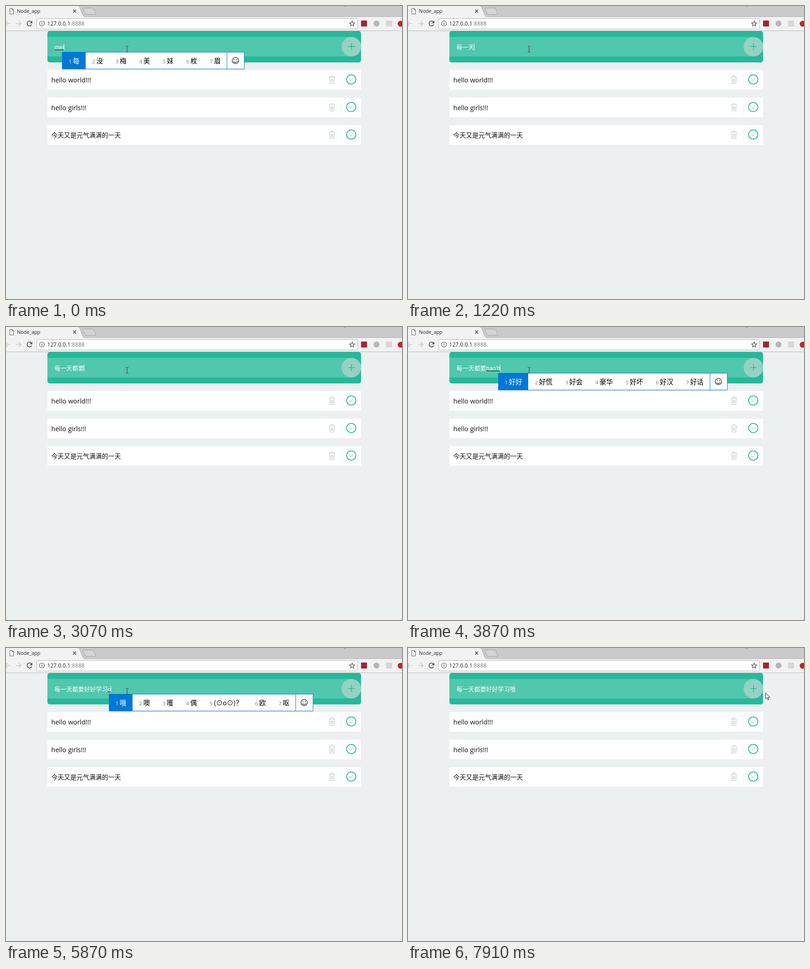
Write an HTML page with a canvas that moves like this. It is 870 by 644 pixels and loops after 8000 ms.

```html
<!DOCTYPE html>
<html lang="zh-CN">
<head>
<meta charset="utf-8">
<title>Node_app</title>
<style>
html, body { margin: 0; width: 100%; height: 100%; overflow: hidden; background: #ecf0f1; }
canvas { display: block; }
</style>
</head>
<body>
<canvas id="stage" width="870" height="644"></canvas>
<script>
const g = document.getElementById('stage').getContext('2d');
const CJK = '"Noto Sans CJK SC", "Noto Sans CJK", sans-serif';
const UI = '"Open Sans", "Noto Sans", ' + CJK;
const INPUT_FONT = '13px "Liberation Sans", ' + CJK;
const CAND_FONT = '14.67px ' + CJK;
const GREEN = '#25b99a', BLUE = '#0078d7', LOOP = 8000;

// start time, committed text, composing text, candidates
const A = '每一天', B = A + '都要', C = B + '好好学习';
const states = [
  [0, '', 'mei', '每 没 梅 美 妹 枚 眉'],
  [280, '', "mei'y", '每one 美元 没有 每月 梅雨 每一 没用'.replace('one', '样')],
  [410, '', "mei'yi", '每一 美意 美伊 美衣 美仪 美一 没一'],
  [560, '', "mei'yi't", '每一天 每一条 每一台 每一套 每一题 每一 美意'],
  [690, '', "mei'yi'ti", '每一题 每一 美意 美伊 美衣 美仪 美一'],
  [820, '', "mei'yi'tia", '每一条 每一 美意 美伊 美衣 美仪 美一'],
  [950, '', "mei'yi'tian", '每一天 每一 美意 美伊 美衣 美仪 美一'],
  [1220, A, ''],
  [1600, A, 'd', '的 都 到 大 对 多 地'],
  [1720, A, 'do', '都 动 东 懂 斗 豆 冬'],
  [1850, A, 'dou', '都 斗 豆 逗 o((⊙﹏⊙))o. 窦 抖'],
  [2130, A, "dou'y", '都有 都要 都用 抖音 都以 斗鱼 豆芽'],
  [2260, A, "dou'ya", '豆芽 斗鸭 都压 都 斗 豆 逗'],
  [2640, A, "dou'yao", '都要 斗妖 都 斗 豆 逗 抖'],
  [3070, B, ''],
  [3340, B, 'ha', '哈 蛤 铪 虾 奤 哈哈 哈儿'],
  [3460, B, 'hao', '好 号 浩 豪 (⊙o⊙)？ 毫 耗'],
  [3870, B, "hao'h", '好好 好慌 好会 豪华 好坏 好汉 好话'],
  [4020, B, "hao'hao", '好好 浩浩 豪豪 号号 昊昊 好号 好豪'],
  [5010, B, "hao'hao'x", '好好学 好好想 好好笑 好好 浩浩 豪豪 号号'],
  [5140, B, "hao'hao'xu", '好好需 好好 浩浩 豪豪 号号 昊昊 好号'],
  [5280, B, "hao'hao'xue", '好好学 好好 浩浩 豪豪 号号 昊昊 好号'],
  [5430, B, "hao'hao'xue'x", '好好学习 好好学 好好 浩浩 豪豪 号号 昊昊'],
  [5560, B, "hao'hao'xue'xi", '好好学习天天向上 好好学习 好好学 好好 浩浩 豪豪 号号'],
  [5700, C, ''],
  [5870, C, 'o', '哦 噢 嚄 偶 (⊙o⊙)？ 欧 呕'],
  [6130, C + '哦', '']
];
const caretOff = [[4580, 5010], [6680, 7080], [7630, LOOP]];
const pointer = [
  [0, 266, 95], [7080, 300, 96], [7220, 430, 118], [7350, 590, 147],
  [7500, 730, 172], [7630, 798, 165], [7770, 796, 128], [7910, 785, 98]
];

const at = (list, t) => list.filter(item => item[0] <= t).pop();

function rect(x, y, w, h, color) {
  g.fillStyle = color;
  g.fillRect(x, y, w, h);
}
function shape(path, fill, stroke, width = 1) {
  const p = typeof path === 'string' ? new Path2D(path) : path;
  if (fill) { g.fillStyle = fill; g.fill(p); }
  if (stroke) { g.strokeStyle = stroke; g.lineWidth = width; g.stroke(p); }
}
function box(x, y, w, h, r, fill, stroke) {
  const p = new Path2D();
  p.roundRect(x, y, w, h, r);
  shape(p, fill, stroke);
}
function circle(x, y, r, fill, stroke, width) {
  const p = new Path2D();
  p.arc(x, y, r, 0, 7);
  shape(p, fill, stroke, width);
}
// Draws text and returns its width
function text(str, x, y, font, color) {
  g.font = font;
  g.fillStyle = color;
  g.fillText(str, x, y);
  return g.measureText(str).width;
}

function drawBrowser() {
  rect(0, 0, 870, 24, '#cacaca');
  rect(742, 0, 4, 1, '#888');
  rect(0, 23, 870, 31, '#f2f2f2');
  rect(0, 23, 870, 1, '#b4b4b4');
  shape('M0 24V0H158C161 0 162 3 163 6L168 19Q170 23.5 174 24Z', '#f2f2f2');
  shape('M158 0C161 0 162 3 163 6L168 19Q170 23.5 174 23.5', null, '#adadad');
  shape('M170.500 4.500H190Q192 4.500 193 7L197 17Q197.500 18.500 195.500 18.500H177Q174.500 18.500 173.500 16L169 6.500Q168.500 4.500 170.500 4.500Z', '#d4d4d4', '#a2a2a2');
  shape('M8.500 5.500H13.500L16.500 8.500V17.500H8.500ZM13.500 5.500V8.500H16.500', '#fff', '#555');
  text('Node_app', 24, 15, '10.8px ' + UI, '#222');
  shape('M147.500 8L154 14.500M154 8L147.500 14.500', null, '#444', 1.5);

  rect(0, 54, 870, 1, '#b8b8b8');
  shape('M-3 38.500H9M3 33.500L-2 38.500L3 43.500M22 38.500H33M28 33.500L33 38.500L28 43.500', null, '#c6c6c6', 1.7);
  shape('M56 35.500A5.300 5.300 0 1 0 56.500 40.500', null, '#505050', 1.8);
  shape('M57.800 32.500V38H52.300Z', '#505050');
  box(67.5, 27.5, 705, 23, 2, '#fff', '#b3b3b3');
  circle(79, 38.5, 5.5, null, '#555', 1.2);
  rect(78.3, 37.5, 1.5, 4, '#555');
  rect(78.3, 35, 1.5, 1.5, '#555');
  const w = text('127.0.0.1', 90.5, 43, '12.1px ' + UI, '#222');
  text(':8888', 90.5 + w, 43, '12.1px ' + UI, '#777');

  const star = new Path2D();
  for (let i = 0; i < 10; i++) {
    const r = i % 2 ? 2.6 : 6, a = i * Math.PI / 5 - Math.PI / 2;
    star.lineTo(760.5 + r * Math.cos(a), 39 + r * Math.sin(a));
  }
  star.closePath();
  shape(star, null, '#4d4d4d', 1.2);
  rect(780, 32, 13, 13, '#a5242f');
  circle(814, 38.5, 6.5, '#b5b5b5');
  rect(835, 32, 13, 13, '#d6d6d6');
  circle(867, 39, 6.5, '#cf2020');
}

function drawRow(label, y, size) {
  rect(91, y, 689, 43, '#fff');
  text(label, 99.5, y + 27, size + 'px ' + UI, '#111');
  g.save();
  g.translate(0, y);
  shape('M709.500 15.500H722.500M713.500 15V12.500H718.500V15M710.500 16L711.500 29.500H720.500L721.500 16M713.800 18.500V27M716 18.500V27M718.200 18.500V27', null, '#bcc8c6');
  rect(737, 9, 1, 27, '#edf0f1');
  circle(758.5, 20.5, 10.2, null, GREEN, 1.8);
  shape('M754.500 20.500L757.500 23.300L762.500 17.800', null, '#b9c9c6', 1.2);
  g.restore();
}

function drawPage() {
  rect(0, 55, 870, 589, '#ecf0f1');
  box(91, 55, 689, 69, 5, GREEN);
  box(91, 68, 689, 43, [2, 21.5, 21.5, 2], '#51c7ae');
  circle(758.8, 89.5, 21.5, '#95d1c4');
  rect(752, 88.5, 14, 1.5, GREEN);
  rect(758.2, 82, 1.5, 14, GREEN);
  drawRow('hello world!!!', 141, 14.5);
  drawRow('hello girls!!!', 201.5, 14.5);
  drawRow('今天又是元气满满的一天', 262, 13.9);
}

function drawCandidates(x, words) {
  g.font = CAND_FONT;
  const widths = words.map(word => 37.05 + g.measureText(word).width);
  const split = Math.round(x + widths.reduce((a, b) => a + b, 0));
  rect(x, 101, split + 39 - x, 38, BLUE);
  rect(x + 1, 102, split + 37 - x, 36, '#fff');
  rect(split, 101, 1, 38, BLUE);
  rect(x, 101, Math.round(widths[0]), 38, BLUE);
  let left = x;
  words.forEach((word, i) => {
    text(i + 1, left + 14.7, 125.5, '11px ' + UI, i ? '#777' : '#fff');
    text(word, left + 23.7, 126, CAND_FONT, i ? '#000' : '#fff');
    left += widths[i];
  });
  const cx = split + 19;
  circle(cx, 120, 7, null, '#111', 1.2);
  circle(cx - 2.6, 118, 1, '#111');
  circle(cx + 2.6, 118, 1, '#111');
  g.beginPath();
  g.arc(cx, 120.3, 4, 0.3, Math.PI - 0.3);
  g.stroke();
}

function drawInput(t) {
  const [, done, typing, words] = at(states, t);
  const start = 106.5 + text(done, 106.5, 94.5, INPUT_FONT, '#fff');
  const end = start + text(typing, start, 94.5, INPUT_FONT, '#fff');
  if (typing) rect(Math.round(start), 96, Math.round(end - start), 1, '#111');
  if (!caretOff.some(([from, to]) => t >= from && t < to)) rect(Math.floor(end), 83, 1, 14, '#fff');
  if (words) drawCandidates(Math.round(end - 4.5), words.split(' '));
}

function drawPointer(t) {
  const [, x, y] = at(pointer, t);
  g.save();
  g.translate(x, y);
  if (y < 111 && x < 780) {
    shape('M-3 -6.500H-1L0 -5.500L1 -6.500H3M0 -5.500V5.500M-3 6.500H-1L0 5.500L1 6.500H3', null, '#333');
  } else {
    shape('M.500 .500V14L3.500 11L5.500 16L7.700 15L5.600 10.300H9.700Z', '#fff', '#222');
  }
  g.restore();
}

function frame(now) {
  const t = now % LOOP;
  drawPage();
  drawBrowser();
  drawInput(t);
  drawPointer(t);
  requestAnimationFrame(frame);
}
frame(0);
</script>
</body>
</html>
```
